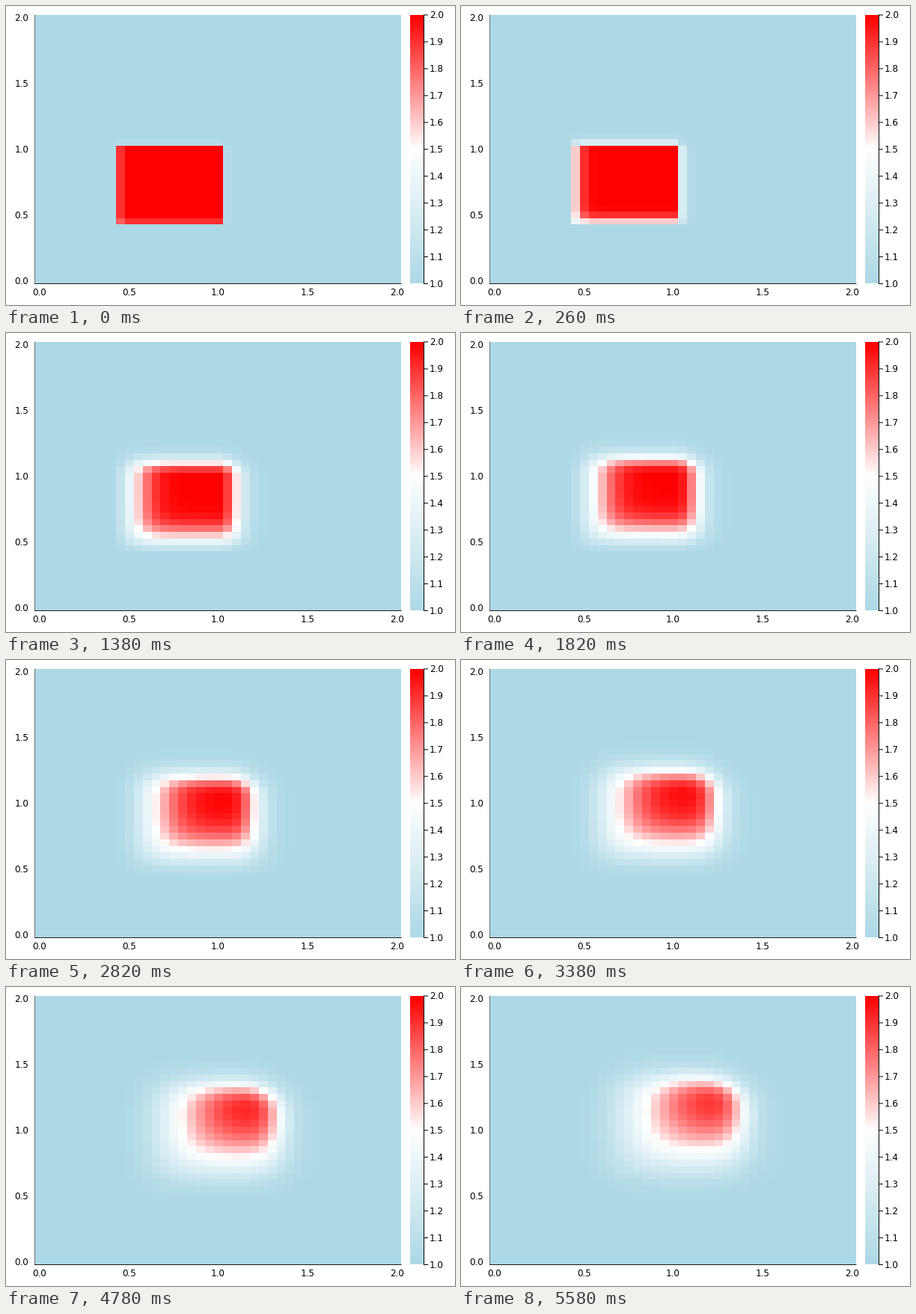
Write a matplotlib script that moves like this. It is 600 by 400 pixels and loops after 5620 ms.

```python
import numpy as np
import matplotlib.pyplot as plt
from matplotlib.animation import FuncAnimation
from matplotlib.colors import LinearSegmentedColormap

W, H, DPI = 600, 400, 100
N = 41                      # grid points per side on [0, 2]
TICKS, INTERVAL = 281, 20
COURANT = 0.045             # dt / dx
PX = 72 / DPI               # one pixel in points

cmap = LinearSegmentedColormap.from_list("heat", ["lightblue", "white", "red"], N=256)


def step(u):
    """Upwind step of nonlinear convection with equal x and y velocities."""
    new = u.copy()
    c = u[1:, 1:]
    new[1:, 1:] = c - COURANT * c * (2 * c - u[1:, :-1] - u[:-1, 1:])
    new[0, :] = new[-1, :] = new[:, 0] = new[:, -1] = 1
    return new


def simulate(count):
    u = np.ones((N, N))
    u[9:21, 9:21] = 2
    states = []
    for _ in range(count):
        u = step(u)
        states.append(u)
    return states


def state_at(k):
    """Three states per seven ticks, held for 1, 5 and 1 ticks."""
    cycle, phase = divmod(k, 7)
    return 3 * cycle + (phase >= 1) + (phase >= 6)


states = simulate(state_at(TICKS - 1) + 1)

fig = plt.figure(figsize=(W / DPI, H / DPI), dpi=DPI, facecolor="white")
ax = fig.add_axes([0, 0, 1, 1])
ax.axis("off")

# Heatmap on whole-pixel cell borders
cells = np.arange(N + 1)
x_edges = np.ceil(39 + 489 * cells / N)
y_edges = np.floor(12 + 360 * (N - cells) / N)
mesh = ax.pcolormesh(x_edges, y_edges, states[0], cmap=cmap, vmin=1, vmax=2,
                     antialiased=False, linewidth=0)

# Colour bar
ax.imshow(np.linspace(2, 1, 360)[:, None], cmap=cmap, vmin=1, vmax=2, aspect="auto",
          extent=(540, 558, 371, 12), interpolation="nearest")
ax.set_xlim(0, W)
ax.set_ylim(H, 0)


def line(xs, ys, color="black"):
    ax.plot(xs, ys, color=color, lw=PX, solid_capstyle="butt", snap=False)


def label(x, y, value, ha):
    ax.text(x, y + 4, f"{value:.1f}", ha=ha, va="baseline",
            fontsize=12 * PX, family="DejaVu Sans", color="black")


line([38.5, 38.5], [11.5, 372], "#6e6e6e")
line([38, 528.5], [371.5, 371.5], "#1a1a1a")
line([558.5, 558.5], [11.5, 372])

for i in range(5):
    label(45 + 489 * 10 * i / N, 383.2, i / 2, "center")
    label(30.5, 367.6 - 360 * 10 * i / N, i / 2, "right")

for i in range(11):
    y = 371.5 - 35.95 * i
    line([558, 564], [y, y])
    label(566, y, 1 + i / 10, "left")


def update(k):
    mesh.set_array(states[state_at(k)])
    return [mesh]


anim = FuncAnimation(fig, update, frames=TICKS, interval=INTERVAL, repeat=True,
                     repeat_delay=0, blit=False)
plt.show()
```
